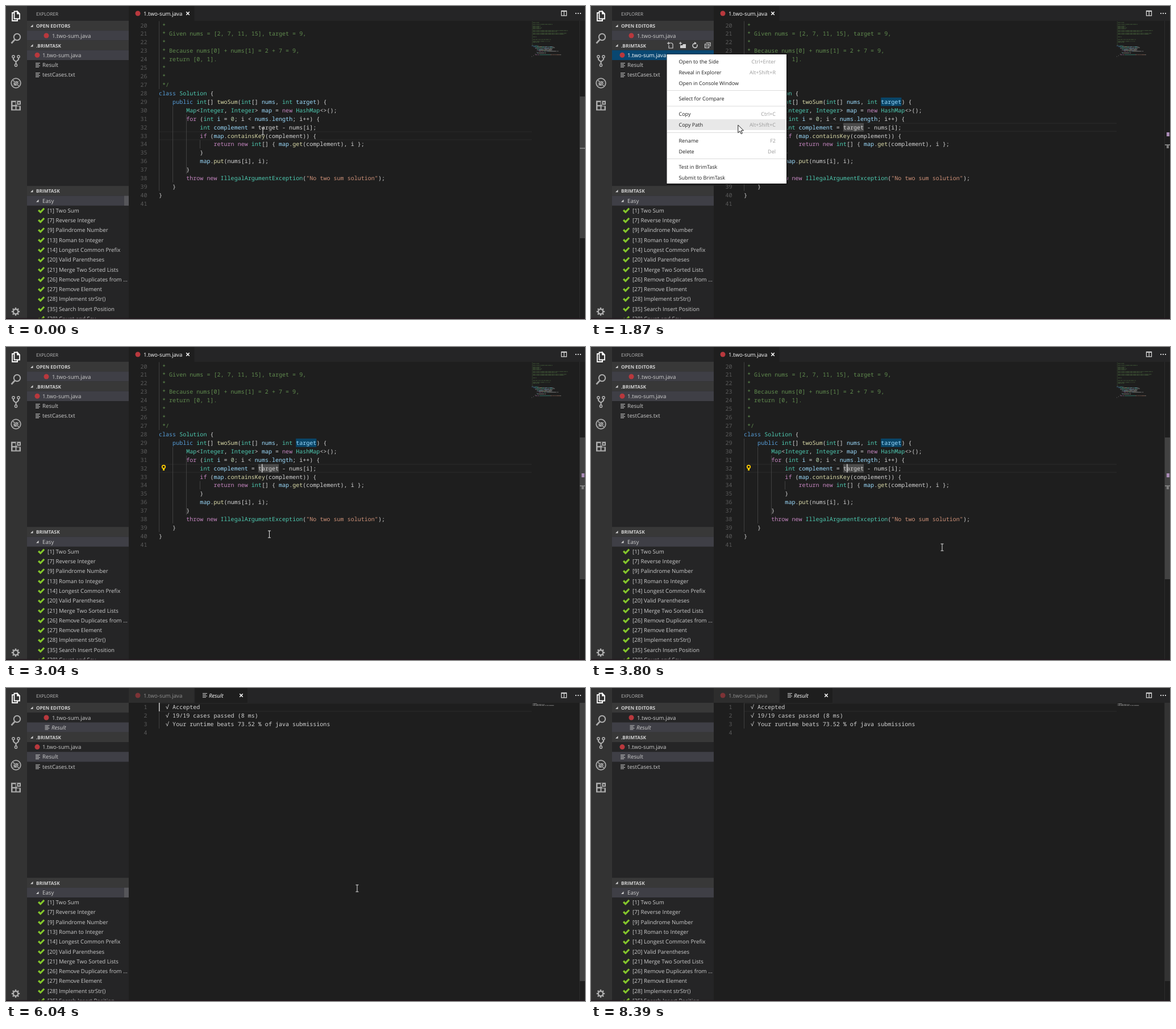
Recreate the animation shown at these times as an HTML page with a canvas. Size 1019x550 px, loop 8.49 s.

```html
<!DOCTYPE html>
<html lang="en">
<head>
<meta charset="utf-8">
<title>Editor</title>
<style>
html, body { margin: 0; width: 100%; height: 100%; overflow: hidden; background: #1e1e1e; }
canvas { display: block; }
</style>
</head>
<body>
<canvas id="stage" width="1019" height="550"></canvas>
<script>
const W = 1019, H = 550, LOOP = 8490;
const ROW = 17.29, LINE = 14.925, COL = 6.03, CODE_X = 269;
const UI = '"Open Sans", "Noto Sans", sans-serif';
const MONO = '10.05px "Noto Sans Mono", "DejaVu Sans Mono", monospace';
const SELECTED = '#3f3f46', FG = '#d4d4d4';
const ctx = document.getElementById('stage').getContext('2d', { alpha: false, willReadFrequently: true });
ctx.textRendering = 'geometricPrecision';

const prose = n => ' * ' + 'given an array of integers return indices '.repeat(3).slice(0, n);
const intro = [0, 14, 0, 44, 0, 17, 15, 20, 18, 0, 78, 54, 0, 76, 70, 0, 0, 8, 0].map(prose);
const code = intro.concat(` *
 * Given nums = [2, 7, 11, 15], target = 9,
 *
 * Because nums[0] + nums[1] = 2 + 7 = 9,
 * return [0, 1].
 *
 *
 */
class Solution {
    public int[] twoSum(int[] nums, int target) {
        Map<Integer, Integer> map = new HashMap<>();
        for (int i = 0; i < nums.length; i++) {
            int complement = target - nums[i];
            if (map.containsKey(complement)) {
                return new int[] { map.get(complement), i };
            }
            map.put(nums[i], i);
        }
        throw new IllegalArgumentException("No two sum solution");
    }
}
`.split('\n'));
const result = [
  '  √ Accepted',
  '  √ 19/19 cases passed (8 ms)',
  '  √ Your runtime beats 73.52 % of java submissions',
  ''
];
const problems = ['[1] Two Sum', '[7] Reverse Integer', '[9] Palindrome Number', '[13] Roman to Integer',
  '[14] Longest Common Prefix', '[20] Valid Parentheses', '[21] Merge Two Sorted Lists',
  '[26] Remove Duplicates from ...', '[27] Remove Element', '[28] Implement strStr()',
  '[35] Search Insert Position', '[38] Count and Say'];
const menuItems = [
  [97, 'Open to the Side', 'Ctrl+Enter'], [116, 'Reveal in Explorer', 'Alt+Shift+R'],
  [135, 'Open in Console Window', ''], [162, 'Select for Compare', ''],
  [189.5, 'Copy', 'Ctrl+C'], [208.5, 'Copy Path', 'Alt+Shift+C'],
  [236, 'Rename', 'F2'], [255, 'Delete', 'Del'],
  [282, 'Test in BrimTask', ''], [301, 'Submit to BrimTask', '']
];

// Syntax colours, one per capture group
const syntax = /(".*?")|\b(class|public)\b|\b(for|if|return|new|throw)\b|\b(int|[A-Z]\w*)\b|(\w+)(?=\()|((?<=(?:int|\]|>) )[a-z]\w*|[a-z]\w*(?=\.)|(?<=\.)length)|\b(\d+)\b/g;
const palette = ['#ce9178', '#569cd6', '#c586c0', '#4ec9b0', '#dcdcaa', '#9cdcfe', '#b5cea8'];

function tokens(line) {
  if (line.startsWith(' *')) return [[0, line, '#608b4e']];
  const out = [];
  let end = 0;
  for (const m of line.matchAll(syntax)) {
    out.push([end, line.slice(end, m.index), FG]);
    out.push([m.index, m[0], palette[m.slice(1).findIndex(Boolean)]]);
    end = m.index + m[0].length;
  }
  out.push([end, line.slice(end), FG]);
  return out.filter(part => part[1].trim());
}
const codeTokens = code.map(tokens);
const resultTokens = result.map(s => [[0, s, FG]]);

function rect(x, y, w, h, color) {
  ctx.fillStyle = color;
  ctx.fillRect(x, y, w, h);
}
function text(s, x, y, color = '#cccccc', font = '9.7px ' + UI, align = 'left') {
  ctx.font = font;
  ctx.fillStyle = color;
  ctx.textAlign = align;
  ctx.fillText(s, x, y + 3.5);
}
function trace(points, close) {
  ctx.beginPath();
  for (let i = 0; i < points.length; i += 2) ctx.lineTo(points[i], points[i + 1]);
  if (close) ctx.closePath();
}
function fill(color, ...points) {
  trace(points, true);
  ctx.fillStyle = color;
  ctx.fill();
}
function stroke(color, width, ...points) {
  trace(points);
  ctx.strokeStyle = color;
  ctx.lineWidth = width;
  ctx.stroke();
}
function disc(x, y, r, color) {
  ctx.beginPath();
  ctx.arc(x, y, r, 0, 2 * Math.PI);
  ctx.fillStyle = color;
  ctx.fill();
}
function ring(x, y, r, color, width, from = 0, to = 2 * Math.PI) {
  ctx.beginPath();
  ctx.arc(x, y, r, from, to);
  ctx.strokeStyle = color;
  ctx.lineWidth = width;
  ctx.stroke();
}
function box(x, y, w, h, color, width) {
  ctx.strokeStyle = color;
  ctx.lineWidth = width;
  ctx.strokeRect(x, y, w, h);
}

const javaIcon = (x, y, color = '#b8383d') => disc(x, y, 4.5, color);
function fileIcon(x, y) {
  [8, 6, 8, 6].forEach((w, i) => rect(x - 4, y - 4 + i * 2.3, w, 1, '#c5c5c5'));
}
const twisty = (x, y) => fill('#d0d0d0', x, y + 2.5, x + 4.5, y + 2.5, x + 4.5, y - 2);
function cross(x, y) {
  stroke('#ffffff', 1.6, x - 2.7, y - 2.7, x + 2.7, y + 2.7);
  stroke('#ffffff', 1.6, x + 2.7, y - 2.7, x - 2.7, y + 2.7);
}
const check = (x, y) => fill('#84c62c', x - 6, y + 0.5, x - 3.7, y - 2, x - 1.2, y + 0.6,
  x + 4, y - 4.8, x + 6.2, y - 2.6, x - 1.2, y + 5);

function activityBar() {
  const c = '#adadad', bg = '#333333';
  rect(0, 0, 37, H, bg);
  stroke('#fff', 1.8, 14, 12, 11, 12, 11, 26, 20, 26, 20, 23);
  stroke('#fff', 1.8, 20, 9.5, 14.5, 9.5, 14.5, 22.5, 24, 22.5, 24, 13.5, 20, 9.5, 20, 13.5, 24, 13.5);

  ring(19.5, 54.5, 5.7, c, 2);
  stroke(c, 2.6, 15.5, 59, 9.5, 65.5);

  stroke(c, 2, 13, 91, 13, 94, 17.5, 98, 17.5, 102);
  stroke(c, 2, 22, 91, 22, 94, 17.5, 98);
  for (const [x, y] of [[13, 89], [22, 89], [17.5, 104]]) ring(x, y, 2.1, c, 1.6);

  ring(17.5, 135.5, 8.3, c, 1.8);
  disc(17.5, 136, 3.7, c);
  for (const dy of [-3, 0, 3]) stroke(c, 1, 12.5, 136 + dy, 22.5, 136 + dy);
  stroke(bg, 2.6, 12, 130, 23, 141);
  stroke(c, 1.4, 11.5, 129.5, 23.5, 141.5);

  rect(9, 166.5, 17, 17, c);
  for (const [x, y] of [[11.5, 169], [11.5, 176.5], [18.5, 176.5]]) rect(x, y, 5, 5, bg);
  rect(17.5, 166.5, 2, 7, bg);
  rect(19.5, 173.5, 6.5, 2, bg);
  rect(21.5, 169, 2.5, 2.5, bg);

  ring(17, 537, 4.2, c, 2.4);
  for (let a = 0; a < 8; a++) {
    const x = Math.cos(a * Math.PI / 4), y = Math.sin(a * Math.PI / 4);
    stroke(c, 2.4, 17 + x * 4.8, 537 + y * 4.8, 17 + x * 7.2, 537 + y * 7.2);
  }
}

function section(label, y) {
  rect(37, y - 8.6, 179, ROW, '#383838');
  twisty(43, y);
  text(label, 53, y, '#d0d0d0', 'bold 8.3px ' + UI);
}
const select = (y, color = SELECTED) => rect(37, y - 8.6, 179, ROW, color);

function toolbar(y) {
  const c = '#d0d0d0';
  stroke(c, 1.2, 138, y - 4, 142, y - 4, 144, y - 2, 144, y + 5, 137, y + 5, 137, y);
  fill(c, 157, y, 161, y, 162, y - 2, 167, y - 2, 167, y + 5, 157, y + 5);
  for (const x of [136.5, 157.5]) {
    stroke(c, 1.2, x - 2.5, y - 3.5, x + 2.5, y - 3.5);
    stroke(c, 1.2, x, y - 6, x, y - 1);
  }
  ring(183, y + 0.5, 4, c, 1.5, -0.5, 4.4);
  fill(c, 182, y - 6, 186, y - 3.5, 182, y - 1);
  box(200.5, y - 2, 7, 6.5, c, 1.2);
  stroke(c, 1.2, 202.5, y - 4.5, 210, y - 4.5, 210, y + 2);
  stroke(c, 1.2, 202, y + 1.2, 206, y + 1.2);
}

function sidebar(s) {
  const shift = s.done ? ROW : 0, tree = 69 + shift, list = 324.8 + shift;
  rect(37, 0, 179, H, '#252526');
  text('EXPLORER', 53, 13, '#bbbbbb', '8.1px ' + UI);

  section('OPEN EDITORS', 34.5);
  select(51.8 + shift);
  javaIcon(71, 52);
  text('1.two-sum.java', 81, 52);
  if (s.done) {
    fileIcon(72.5, 69.5);
    text('Result', 80, 69.3, '#cccccc', 'italic 9.7px ' + UI);
  }

  section('.BRIMTASK', tree);
  if (s.tools) toolbar(tree);
  select(tree + ROW * (s.done ? 2 : 1), s.menu ? '#094771' : SELECTED);
  javaIcon(55, tree + ROW);
  text('1.two-sum.java', 64, tree + ROW, s.menu ? '#ffffff' : '#cccccc');
  ['Result', 'testCases.txt'].forEach((name, i) => {
    const y = tree + ROW * (i + 2);
    fileIcon(56, y + 0.3);
    text(name, 64, y);
  });

  section('BRIMTASK', list);
  select(list + ROW);
  twisty(53, list + ROW);
  text('Easy', 64, list + ROW);
  if (s.listBar) rect(208, list + 8.7, 8, ROW, 'rgba(121,121,121,.4)');
  problems.forEach((name, i) => {
    const y = list + ROW * (i + 2);
    check(62, y);
    text(name, 73, y);
  });
}

function tabs(done) {
  rect(216, 0, W - 216, 26, '#252526');
  rect(216, 0, 115.5, 26, done ? '#2d2d2d' : '#1e1e1e');
  javaIcon(232, 13, done ? '#7d3336' : '#b8383d');
  text('1.two-sum.java', 242, 13, done ? '#909090' : '#ffffff');
  if (done) {
    rect(332.5, 0, 92.5, 26, '#1e1e1e');
    fileIcon(350, 13);
    text('Result', 357, 13, '#ffffff', 'italic 9.7px ' + UI);
  }
  cross(done ? 414 : 320, 13);
  box(977.5, 8.5, 9, 8.5, '#d0d0d0', 1.3);
  rect(977, 8, 10, 2, '#d0d0d0');
  rect(981.5, 8, 1.3, 9, '#d0d0d0');
  for (let i = 0; i < 3; i++) rect(1002 + i * 4, 12, 2, 2, '#d0d0d0');
}

function guide(col, y, rows) {
  rect(CODE_X + Math.round(col * COL), y, 1, rows * LINE, '#404040');
}
function currentLine(y) {
  rect(CODE_X, y - 7.5, 656, 1, '#2b2b2b');
  rect(CODE_X, y + 6.5, 656, 1, '#2b2b2b');
}
function codeLine(parts, number, y) {
  text(String(number), 248.5, y, '#5a5a5a', MONO, 'right');
  for (const [col, s, color] of parts) text(s, CODE_X + col * COL, y, color, MONO);
}
function minimap(lines) {
  ctx.globalAlpha = 0.5;
  lines.forEach((parts, i) => {
    for (const [col, s, color] of parts)
      for (const m of s.matchAll(/\S+/g))
        rect(925 + (col + m.index) * 0.786, 27 + i * 1.572, m[0].length * 0.786, 1, color);
  });
  ctx.globalAlpha = 1;
}
function bulb(x, y) {
  ring(x, y - 1.5, 2.8, '#ffcc00', 1.7);
  rect(x - 1.5, y + 1.5, 3, 3.5, '#ffcc00');
}

function codeEditor(s) {
  const lineY = n => 34 + (n - 20) * LINE, top = n => lineY(n) - LINE / 2;
  currentLine(lineY(s.clicked ? 32 : 33));
  guide(0, top(20), 8);
  guide(0, top(29), 11);
  guide(4, top(30), 9);
  guide(8, top(31), 7);
  guide(12, top(34), 1);
  if (s.marked) {
    rect(CODE_X + 40 * COL, top(29), 6 * COL, LINE, '#094568');
    rect(CODE_X + 29 * COL, top(32), 6 * COL, LINE, '#4a4a4a');
    bulb(277.5, lineY(32) - 1);
  }
  for (let n = 20; n <= 41; n++) codeLine(codeTokens[n - 1], n, lineY(n));
  if (s.clicked && s.caret) rect(450, top(32), 1.5, LINE, '#d0d0d0');
  minimap(codeTokens);

  if (!s.menu) rect(1010, 159, 9, 249, '#424242');
  rect(1010, s.clicked ? 243 : 249, 9, 2, '#7c7c7c');
  if (s.marked) {
    rect(1013, 222, 5, 7, '#a98bb5');
    rect(1013, 245, 4, 5, '#7c7c7c');
  }
}

function resultEditor(s) {
  currentLine(34);
  guide(0, 34 - LINE / 2, 3);
  resultTokens.forEach((parts, i) => codeLine(parts, i + 1, 33.7 + i * LINE));
  if (s.caret) rect(CODE_X, 26, 1.5, 15, '#d0d0d0');
  minimap(resultTokens);
  rect(1010, 26, 9, 489, s.slider);
}

function contextMenu(s) {
  rect(133, 84.5, 212.5, 229, '#151515');
  rect(133.5, 85, 210.5, 227, '#ffffff');
  for (const y of [148, 175.5, 222, 268]) rect(134, y, 209.5, 1, '#dcdcdc');
  for (const [y, label, keys] of menuItems) {
    if (s.x > 135 && Math.abs(s.y - y) < 9.5) rect(134.5, y - 9.5, 209, 19, '#e8e8e8');
    text(label, 154.5, y, '#1e1e1e', '9px ' + UI);
    text(keys, 325, y, '#9a9a9a', '9px ' + UI, 'right');
  }
}

// Pointer moves: first step, last step, number of steps, end point
const moves = [
  [110, 220, 2, 452, 214], [420, 930, 6, 134, 86], [1570, 1970, 5, 290, 240],
  [2160, 2280, 3, 309, 306], [3040, 3140, 2, 618, 352], [7760, 8390, 7, 849, 562]
];
function pointerAt(t) {
  let x = 452, y = 220;
  for (const [from, to, steps, ex, ey] of moves) {
    if (t < from) break;
    const step = Math.floor((t - from) / (to - from) * (steps - 1) + 1e-6) + 1;
    const k = Math.min(1, step / steps);
    x += (ex - x) * k;
    y += (ey - y) * k;
  }
  return { x, y };
}
function arrow(x, y) {
  const outline = [x, y, x, y + 13.5, x + 3.2, y + 10.6, x + 5.4, y + 15.5, x + 7.5, y + 14.5,
    x + 5.4, y + 9.8, x + 9.6, y + 9.6];
  fill('#ffffff', ...outline);
  stroke('#000000', 0.9, ...outline, x, y);
}
function beam(x, y) {
  rect(x - 0.5, y - 6, 1, 12, '#e0e0e0');
  rect(x - 2.5, y - 6.5, 5, 1, '#e0e0e0');
  rect(x - 2.5, y + 5.5, 5, 1, '#e0e0e0');
}

// Times at which the caret goes off and on again in turn
const blinks = [1250, 3040, 3350, 3800, 4320, 4750, 5300, 5740, 6480, 6900, 7430, 7870, 8390];

function stateAt(t) {
  const { x, y } = pointerAt(t), menu = t >= 1250 && t < 3040, done = t >= 5940;
  return {
    x, y, menu, done,
    clicked: t >= 110,
    marked: t >= 420,
    tools: menu || x < 216,
    caret: blinks.filter(b => b <= t).length % 2 === 0,
    listBar: t < 170 || done && t < 6900,
    slider: t < 6900 ? '#424242' : t < 7970 ? '#282828' : '#333333'
  };
}

function draw(s) {
  rect(0, 0, W, H, '#1e1e1e');
  rect(1009, 26, 1, H - 26, '#2d2d2d');
  tabs(s.done);
  (s.done ? resultEditor : codeEditor)(s);
  sidebar(s);
  activityBar();
  rect(0, 548.5, W, 1.5, '#22171d');
  if (s.menu) contextMenu(s);
  (s.tools ? arrow : beam)(s.x, s.y);
}

// Repaint only when the state differs from the one on screen
const start = performance.now();
let shown = '';
function frame() {
  const state = stateAt((performance.now() - start) % LOOP), key = JSON.stringify(state);
  if (key !== shown) {
    shown = key;
    draw(state);
  }
  requestAnimationFrame(frame);
}
frame();
</script>
</body>
</html>
```
